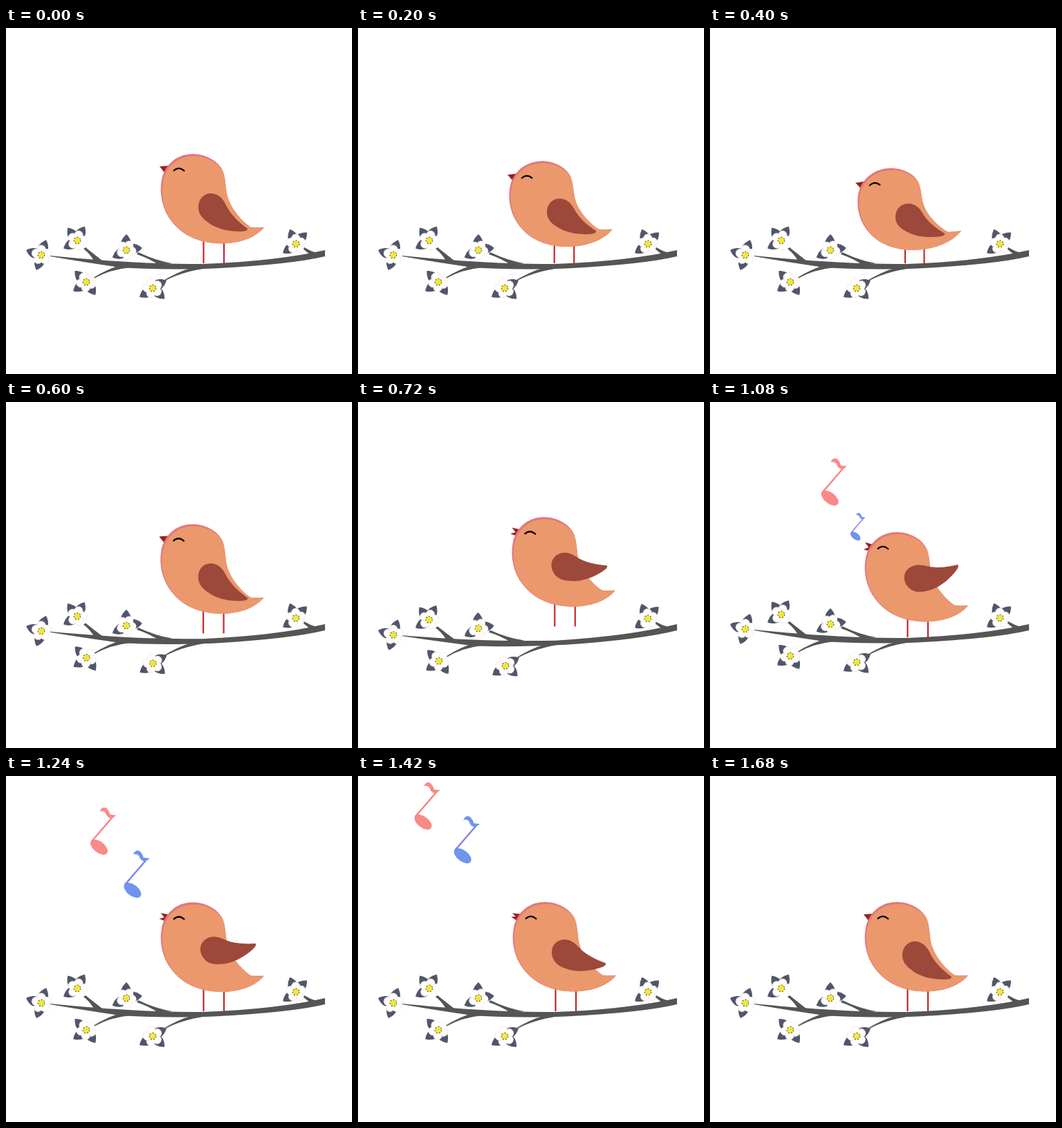
Recreate the animation shown at these times as an HTML page. Size 500 px wide and 500 px high, loop 1800 ms.

```html
<!DOCTYPE html>
<html lang="en">
<head>
<meta charset="utf-8">
<title>Singing bird</title>
<style>
html, body { margin: 0; width: 100%; height: 100%; overflow: hidden; background: #fff; }
svg { display: block; width: 100%; height: 100%; }
</style>
</head>
<body>
<svg viewBox="0 0 500 500">
  <defs>
    <path id="shape" d="M373 288C362 302 340 311 314 311.500C284 312 256 302 239 279C226 262 221 240 225 219C230 196 248 182 270 182C290 182 309 194 314 208C318 220 317 232 320 243C325 262 343 281 354 288Q364 288.500 373 288Z"/>
    <clipPath id="inside"><use href="#shape"/></clipPath>
    <path id="leaf" d="M0 0C4 -11 14 -10 23 0C15 8 4 10 0 0Z" fill="#50566b"/>
    <g id="note">
      <ellipse cx="-6" cy="23" rx="14.500" ry="8" transform="rotate(38 -6 23)"/>
      <path d="M-17 15L14 -21" fill="none" stroke="currentColor" stroke-width="2.400"/>
      <path d="M-5 -29Q-1 -37 5 -33Q9 -29 10 -24L19 -23L12 -18Q5 -20 4 -25Q2 -30 -5 -29Z"/>
    </g>
  </defs>

  <g id="legs" stroke="#c1272d" stroke-width="2.200"><path id="legA"/><path id="legB"/></g>

  <g id="branch">
    <g fill="#555">
      <path d="M64 329C105 333 150 337 205 339.500Q250 341 285 341Q390 337 461 321V330Q410 342 300 347.500Q220 350 165 346Q110 338 64 330Z"/>
      <path d="M112 319L115 317Q126 326 139 336L127 336Q121 326 112 319Z"/>
      <path d="M189 327L191 324Q216 336 240 340L220 342Q207 333 189 327Z"/>
      <path d="M126 361Q148 347 172 341L180 346Q150 349 127 362Z"/>
      <path d="M224 367Q248 352 270 346L290 347Q250 353 225 368Z"/>
      <path d="M429 319L431 317Q439 322 449 325L440 328Z"/>
    </g>
    <g id="flowers"></g>
  </g>

  <g id="bird">
    <g fill="#94261a">
      <path id="beakTop" d="M222 200L235 199L231 206Z"/>
      <path id="beakLow" d="M222 200L233 203L229 209Z"/>
    </g>
    <use href="#shape" fill="#e4777e"/>
    <g clip-path="url(#inside)">
      <use href="#shape" fill="#eb986c" transform="translate(373 311.500) scale(.986 .976) translate(-373 -311.500)"/>
    </g>
    <path d="M242 206.500Q250 199 258 207" fill="none" stroke="#000" stroke-width="2.200"/>
    <path id="wing" fill="#9c483a" d="M278 259C278 247 286 239 296 239C306 239 313 246 317 254C324 270 338 282 349 290C349 293 345 294 338 294C320 294 304 290 292 281C282 274 278 267 278 259Z"/>
  </g>

  <use id="pinkNote" href="#note" fill="#fa8a88" color="#f58486"/>
  <use id="blueNote" href="#note" fill="#6f94ee" color="#7d80ee"/>
</svg>
<script>
const LOOP = 1800;
const $ = id => document.getElementById(id);
const set = (id, value, name = 'transform') => $(id).setAttribute(name, value);
const smooth = u => u * u * (3 - 2 * u);
const linear = u => u;

// keys: [time, value] pairs in order of time
function track(keys, t, ease = smooth) {
  if (t <= keys[0][0]) return keys[0][1];
  for (let i = 1; i < keys.length; i++) {
    const [t0, a] = keys[i - 1], [t1, b] = keys[i];
    if (t < t1) return a + (b - a) * ease((t - t0) / (t1 - t0));
  }
  return keys[keys.length - 1][1];
}

// centre, extra sag while the branch is lifted, leaf angles
const FLOWERS = [
  [51, 328, 0, [-72, 198, 108]],
  [103, 307, 3, [-127, -62, 150]],
  [174, 321, -3, [-90, -8, 152]],
  [116, 367, 1, [-136, 55, 145]],
  [212, 376, -2.5, [-30, 146, 42]],
  [419, 312, 0, [-112, -46, 145]]
];

function flowerMarkup([, , , leaves], i) {
  const ring = [0, 1, 2, 3, 4].map(k => (k * 72 - 90 + i * 14) * Math.PI / 180);
  const petals = ring.map(a =>
    `<circle cx="${8 * Math.cos(a)}" cy="${8 * Math.sin(a)}" r="6.200" fill="#fff" stroke="#f3dede" stroke-width=".6"/>`);
  return `<g id="flower${i}">` +
    leaves.map(a => `<use href="#leaf" transform="rotate(${a})"/>`).join('') +
    petals.join('') +
    '<circle r="7" fill="#fff"/><circle r="4.800" fill="#f2e63a" stroke="#66612f" stroke-width="1.200" stroke-dasharray="2 2.300"/></g>';
}
$('flowers').innerHTML = FLOWERS.map(flowerMarkup).join('');

const CROUCH = [[0, 0], [400, 1], [560, 0]];
const WING = [[580, 0], [800, -45], [920, -22], [1080, -50], [1640, 0]];
const BEAK = [[580, 0], [720, 1], [920, .6], [1080, 1.2], [1420, .6], [1620, 0]];
const SWAY = [[560, 0], [680, -1.5], [920, 2.4], [1080, 0]];
const LANDING = [[1020, 0], [1080, 6], [1280, 0]];

const NOTE_X = [[0, 224], [40, 213.5], [120, 198], [280, 179.5], [380, 157], [580, 103], [620, 100]];
const NOTE_Y = [[0, 192], [40, 180], [120, 167.5], [280, 116], [380, 92], [580, 52], [620, 43.5]];
const NOTE_SIZE = [[0, 0], [40, .6], [100, 1]];

function hop(t) {
  const u = (t - 790) / 230;
  return Math.abs(u) < 1 ? -17.2 * (1 - u * u) : track(LANDING, t);
}

function drawNote(id, t, start, end) {
  const age = t - start;
  const visible = age > 0 && t < end;
  set(id, visible ? 'visible' : 'hidden', 'visibility');
  if (!visible) return;
  const [x, y, size] = [NOTE_X, NOTE_Y, NOTE_SIZE].map(keys => track(keys, age, linear));
  set(id, `translate(${x} ${y}) scale(${size})`);
}

function drawLeg(id, x, top, bottom) {
  set(id, `M${x} ${top}V${bottom}`, 'd');
}

function draw(t) {
  const crouch = track(CROUCH, t);
  const dy = hop(t);
  const dx = Math.min(0, dy) * .08;

  const matrix = [1 - .014 * crouch, -.088 * crouch, .044 * crouch, 1 - .062 * crouch,
    300 - 8 * crouch + dx, 311 + 10 * crouch + dy];
  set('bird', `matrix(${matrix}) translate(-300 -311)`);
  set('wing', `rotate(${track(WING, t)} 288 250)`);

  const beak = track(BEAK, t);
  set('beakTop', `rotate(${17 * beak} 232 204)`);
  set('beakLow', `rotate(${-33 * beak} 232 204)`);

  const legTop = 304 + 10 * crouch + dy;
  const legEnd = 340 + Math.min(0, dy);
  drawLeg('legA', 285.5 - 3.5 * crouch + dx, legTop, legEnd);
  drawLeg('legB', 315 - 5.5 * crouch + dx, legTop, legEnd);

  const sway = track(SWAY, t);
  set('branch', `rotate(${sway} 461 325)`);
  FLOWERS.forEach(([x, y, sag], i) =>
    set('flower' + i, `translate(${x} ${y + sag * Math.max(0, sway) / 2.4})`));

  drawNote('pinkNote', t, 800, 1440);
  drawNote('blueNote', t, 1042, 1680);
}

const began = performance.now();
function frame() {
  draw((performance.now() - began) % LOOP);
  requestAnimationFrame(frame);
}
frame();
</script>
</body>
</html>
```
